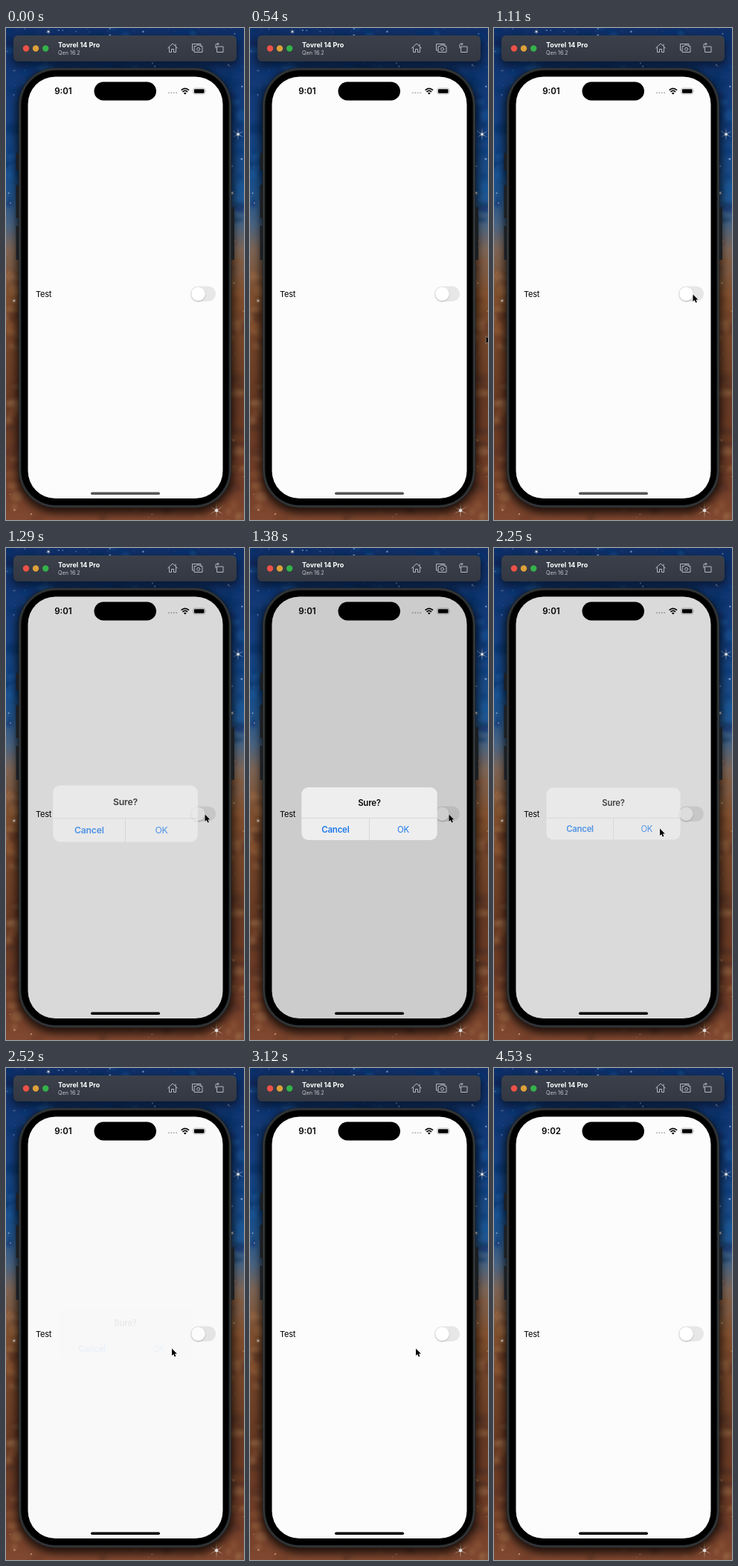
Write an HTML page that moves like this. It is 320 px wide and 662 px high and loops after 5.19 s.

```html
<!DOCTYPE html>
<html lang="en">
<head>
<meta charset="utf-8">
<title>Toggle with confirmation</title>
<style>
  html, body { margin: 0; width: 100%; height: 100%; overflow: hidden; background: #123a78; }
  svg { display: block; width: 100%; height: 100%; }
  text { font-family: Inter, Roboto, sans-serif; }
  .body { font-size: 11.3px; }
  .semi { font-weight: 600; }
  .mid { text-anchor: middle; }
  .icons { fill: none; stroke: #b4b8c1; stroke-width: 1; stroke-linejoin: round; stroke-linecap: round; }
</style>
</head>
<body>
<svg viewBox="0 0 320 662" preserveAspectRatio="none">
  <defs>
    <linearGradient id="sky" x2="0" y2="1">
      <stop offset="0" stop-color="#102f68"/>
      <stop offset=".2" stop-color="#14407f"/>
      <stop offset=".33" stop-color="#1d528c"/>
      <stop offset=".4" stop-color="#4a6482"/>
      <stop offset=".45" stop-color="#7d6556"/>
      <stop offset=".54" stop-color="#80502f"/>
      <stop offset=".75" stop-color="#673a24"/>
      <stop offset=".92" stop-color="#703d28"/>
      <stop offset="1" stop-color="#804830"/>
    </linearGradient>
    <linearGradient id="bar" x2="0" y2="1">
      <stop offset="0" stop-color="#3b404a"/>
      <stop offset="1" stop-color="#333842"/>
    </linearGradient>
    <filter id="haze"><feGaussianBlur stdDeviation="2"/></filter>
    <filter id="soft" x="-50%" y="-50%" width="200%" height="200%"><feGaussianBlur stdDeviation="6"/></filter>
    <filter id="shade" x="-50%" y="-50%" width="200%" height="200%">
      <feDropShadow dx="0" dy="1" stdDeviation="1" flood-opacity=".25"/>
    </filter>
    <clipPath id="screen"><rect x="29.5" y="65.5" width="262" height="567.5" rx="37"/></clipPath>
  </defs>

  <rect width="320" height="662" fill="url(#sky)"/>
  <g id="clouds" filter="url(#haze)"></g>
  <g id="stars"></g>

  <!-- Window bar -->
  <rect x="8" y="14" width="304" height="38" rx="8" opacity=".5" filter="url(#soft)"/>
  <rect x="10" y="10" width="300" height="35" rx="6" fill="url(#bar)"/>
  <circle cx="27" cy="27.5" r="4.2" fill="#ee5148"/>
  <circle cx="40" cy="27.5" r="4.2" fill="#dca03a"/>
  <circle cx="53.2" cy="27.5" r="4.2" fill="#35b14a"/>
  <text x="70" y="26" font-size="9" font-weight="700" fill="#fff">Tovrel 14 Pro</text>
  <text x="70" y="36" font-size="7.2" fill="#bfc3cb">Qen 16.2</text>
  <g class="icons">
    <path d="M217.5 27 224 21l6.500 6M219.500 26v6.500h3v-4h3v4h3V26M228 22v2.500"/>
    <path d="M252.500 30h-2v-8.500h11.500v2M253.500 24.500h2l1-1.500h4l1 1.500h2.500v8h-10.500z"/>
    <circle cx="258.600" cy="28.400" r="2"/>
    <path d="M284 25h8v7.500h-8zM282 27v-4.500q0-1 1-1h3M284.500 20l1.500 1.500-1.500 1.500"/>
  </g>

  <!-- Phone -->
  <rect x="14" y="55" width="292" height="598" rx="54" opacity=".75" filter="url(#soft)"/>
  <g fill="#1b1e22">
    <rect x="13.500" y="168" width="5" height="23" rx="1"/>
    <rect x="13.500" y="211" width="5" height="45" rx="1"/>
    <rect x="13.500" y="266" width="5" height="46" rx="1"/>
    <rect x="302" y="241" width="5" height="71" rx="1"/>
  </g>
  <rect x="17" y="53.500" width="286" height="592" rx="50" fill="#25282a"/>
  <rect x="18.500" y="55" width="283" height="589" rx="48.500" fill="none" stroke="#45484a" stroke-width=".8"/>
  <rect x="20.500" y="57" width="279" height="585" rx="46.500"/>

  <g clip-path="url(#screen)">
    <rect x="29" y="65" width="263" height="569" fill="#fcfcfc"/>
    <text class="body" style="letter-spacing:-.2px;font-size:11px" x="40" y="361.800">Test</text>
    <rect x="248" y="347.500" width="34" height="20.500" rx="10.250" fill="#e7e7e8"/>
    <circle cx="258.400" cy="357.700" r="9.200" fill="#fff" filter="url(#shade)"/>

    <g fill="#b5b5b5">
      <circle cx="218.700" cy="87.300" r="1.050"/><circle cx="222.200" cy="87.300" r="1.050"/>
      <circle cx="225.700" cy="87.300" r="1.050"/><circle cx="229.200" cy="87.300" r="1.050"/>
    </g>
    <g fill="none" stroke="#000" stroke-width="1.700">
      <path d="M235.600 83.600q5.200-4.600 10.400 0M237.500 85.900q3.300-2.900 6.600 0"/>
    </g>
    <path d="M238.900 87.500q1.900-1.500 3.800 0l-1.900 2z"/>
    <rect x="251.700" y="81" width="16" height="8" rx="2.400" fill="none" stroke="#a5a5a5" stroke-width=".7"/>
    <rect x="252.900" y="82.200" width="13.600" height="5.600" rx="1.400"/>
    <path d="M268.600 83.600q1.300 1.400 0 2.800z" fill="#a5a5a5"/>

    <rect id="dim" x="29" y="65" width="263" height="569"/>
    <rect x="118.500" y="72.500" width="83.500" height="25" rx="12.500"/>
    <text id="clock" class="semi mid" font-size="11.500" x="77" y="89"></text>
    <rect id="home" x="114" y="624.500" width="93" height="3.400" rx="1.700"/>

    <g id="alert">
      <rect x="70.500" y="322.500" width="180" height="70" rx="9" fill="#f0f0f0"/>
      <path id="press" d="M161 363.500h89.500v20a9 9 0 0 1-9 9H161z" fill="#e2e2e2"/>
      <path d="M70.500 363.300h180M160.500 363.300v29.200" stroke="#cfcfcf" stroke-width=".7"/>
      <g class="body mid" style="letter-spacing:-.2px">
        <text class="semi" x="160.500" y="346.800">Sure?</text>
        <g fill="#1676ec">
          <text class="semi" x="115.500" y="382.200">Cancel</text>
          <text x="205.300" y="382.200">OK</text>
        </g>
      </g>
    </g>
  </g>

  <path id="cursor" d="M0 0v9.600l2.200-2 1.500 3.500 1.700-.7-1.500-3.400h3z" stroke="#fff" stroke-width=".7" paint-order="stroke"/>
</svg>

<script>
const LOOP = 5190;
const el = id => document.getElementById(id);
const [dim, clock, home, alertBox, press, cursor] =
  ['dim', 'clock', 'home', 'alert', 'press', 'cursor'].map(el);

let seed = 11;
const random = () => (seed = seed * 16807 % 2147483647) / 2147483647;
const pick = list => list[Math.floor(random() * list.length)];

function add(parent, tag, attributes) {
  const node = document.createElementNS(parent.namespaceURI, tag);
  for (const name in attributes) node.setAttribute(name, attributes[name]);
  parent.append(node);
}

function paintSky() {
  for (let i = 0; i < 700; i++) {
    const y = random() * 662;
    const palette = y < 270 ? ['#0b2a60', '#0e3575', '#1d5ba0']
      : ['#4b2b22', '#8f5632', '#a0704c', '#6e3c28'];
    add(el('clouds'), 'ellipse', {
      cx: random() * 320, cy: y, rx: 3 + random() * 9, ry: 2 + random() * 6,
      fill: pick(palette), opacity: .45
    });
  }
  for (let i = 0; i < 650; i++) {
    const y = 662 * random() ** 1.4;
    add(el('stars'), 'circle', {
      cx: random() * 320, cy: y, r: .3 + random() ** 4 * 1.1,
      fill: y < 280 ? '#b4d2f2' : '#d8b394', opacity: .3 + random() * .5
    });
  }
}

function paintBrightStars() {
  for (const [x, y, size] of [[312, 143, 9], [283, 649, 11], [304, 222, 5], [11, 367, 4], [57, 5, 4]]) {
    for (let spike = 0; spike < 6; spike++) {
      add(el('stars'), 'path', {
        d: `M0-${size}L.7 0H-.7z`, fill: '#f4e6d6', opacity: .65,
        transform: `translate(${x} ${y}) rotate(${spike * 60})`
      });
    }
    add(el('stars'), 'circle', { cx: x, cy: y, r: size / 5, fill: '#fff' });
  }
}

const ease = (t, start, end) => {
  const p = Math.min(1, Math.max(0, (t - start) / (end - start)));
  return p * p * (3 - 2 * p);
};
const mix = (a, b, p) => a + (b - a) * p;

function alertLevel(t) {
  if (t < 1260 || t > 2850) return 0;
  return t < 2210 ? 1 - Math.exp(-(t - 1230) / 50) : Math.exp(-(t - 2210) / 110);
}

function draw(t) {
  const level = alertLevel(t);
  dim.setAttribute('opacity', .2 * level);
  alertBox.setAttribute('opacity', level);
  const scale = t < 2210 ? 1 + .28 * (1 - level) : 1;
  alertBox.setAttribute('transform',
    `translate(160.5 357.5) scale(${scale}) translate(-160.5 -357.5)`);
  press.setAttribute('opacity', t >= 2070 && t < 2210 ? 1 : 0);

  const enter = ease(t, 450, 960), toOk = ease(t, 1380, 1740);
  const x = mix(mix(322, 267.5, enter), 223, toOk);
  const y = mix(mix(420, 358.5, enter), 377.5, toOk);
  cursor.setAttribute('transform', `translate(${x} ${y})`);
  cursor.setAttribute('visibility', t >= 450 && t < 4410 ? 'visible' : 'hidden');

  clock.textContent = t < 4410 ? '9:01' : '9:02';
  home.setAttribute('fill', t < 1260 ? '#555' : '#000');
}

function frame() {
  draw(performance.now() % LOOP);
  requestAnimationFrame(frame);
}

paintSky();
paintBrightStars();
frame();
</script>
</body>
</html>
```
